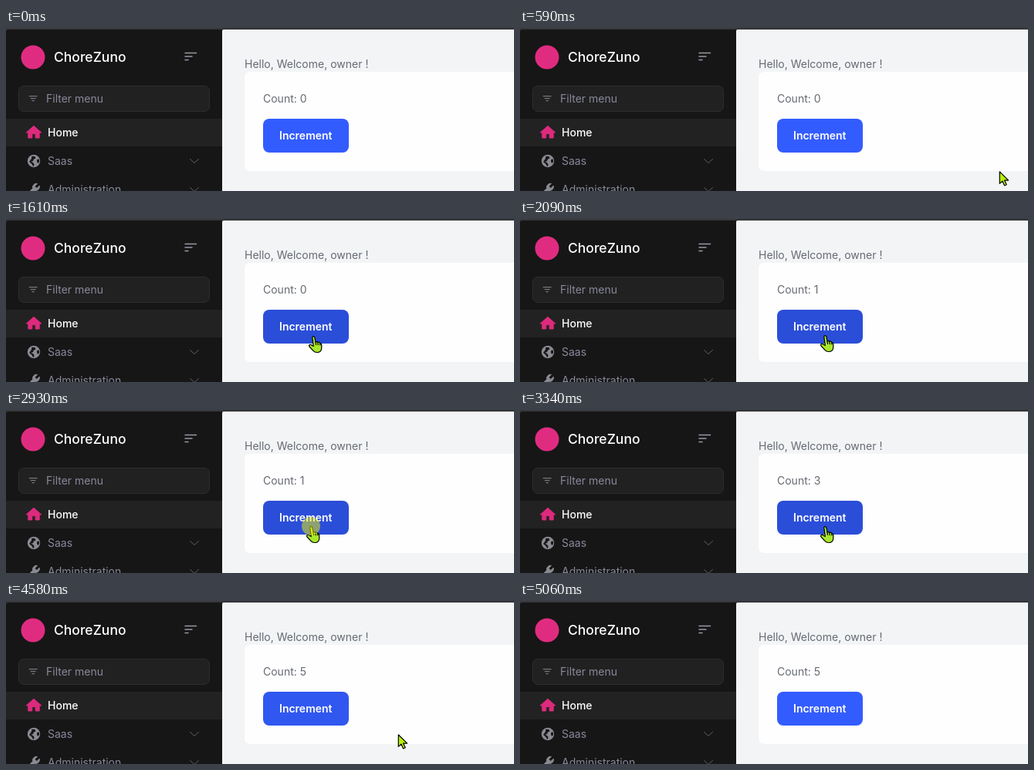
Write an HTML page that moves like this. It is 658 px wide and 212 px high and loops after 5.62 s.

```html
<!DOCTYPE html>
<html lang="en">
<head>
<meta charset="utf-8">
<title>Counter demo</title>
<style>
  html, body { margin: 0; width: 100%; height: 100%; overflow: hidden; background: #f3f4f6; }
  svg { display: block; width: 658px; height: 212px; font: 14px Inter, sans-serif; }
  .menu { fill: #88889c; }
  .line { fill: none; stroke-linecap: round; stroke-linejoin: round; }
  .body { fill: #656a73; }
</style>
</head>
<body>
<svg viewBox="0 0 658 212">
  <rect width="658" height="212" fill="#37373a"/>
  <path d="M0 212V5q0-3 3-3H280V212z" fill="#161616"/>
  <path d="M280 212V4q0-2 2-2H658V212z" fill="#f3f4f6"/>

  <!-- sidebar -->
  <circle cx="35" cy="38" r="15.5" fill="#e02c80"/>
  <text x="62" y="44" font-size="17.5" font-weight="500" fill="#fff">ChoreZuno</text>
  <path class="line" d="M232 32.6h14.5M232 37h9M232 41.4h4" stroke="#9898a6" stroke-width="1.5"/>
  <rect x="16.5" y="75.5" width="247" height="33" rx="6.5" fill="#212121" stroke="#2d2d2d"/>
  <path class="line" d="M30.2 88.7h10M32.2 91.7h6M34 94.7h2.4" stroke="#8b8b96"/>
  <text class="menu" x="52" y="97">Filter menu</text>

  <rect y="118" width="280" height="36" fill="#222"/>
  <path d="M36 127.3 45.8 136h-2.6v7h-5v-5.4h-4.4V143h-5v-7h-2.6z" fill="#dd2a7d" stroke="#dd2a7d" stroke-linejoin="round"/>
  <text x="54" y="141" font-weight="500" fill="#fff">Home</text>

  <circle cx="36" cy="173" r="8.2" fill="#8b8b94"/>
  <path d="M33.5 166.8l4 .2 1 2.6-2.6 1.2-1 2.4-2.6.4 2.8 1.6 1.6 2-1.2 3.2-2.2-3.6-3.2-2.8 2.8-4zM40.2 171l2.6-.6.4 3.4-1.6 2.2-1.6-2z" fill="#161616"/>
  <text class="menu" x="54" y="178">Saas</text>

  <path d="M40.5 202.4l-3 3 .5 2.3 2.3.5 3-3a5 5 0 0 1-6.4 6l-5 5-2.4-2.4 5.2-5.2a5 5 0 0 1 5.8-6.2z" fill="#8b8b94" stroke="#8b8b94" stroke-linejoin="round"/>
  <text class="menu" x="54" y="215">Administration</text>
  <path class="line" d="M238.5 170.5l5.5 5 5.5-5M238.5 207.5l5.5 5 5.5-5" stroke="#606066"/>

  <!-- page -->
  <text class="body" x="309" y="52">Hello, Welcome, owner !</text>
  <path d="M658 57H317q-8 0-8 8v113q0 8 8 8H658z" fill="#fefefe"/>
  <text class="body" id="count" x="333" y="97">Count: 0</text>
  <rect id="button" x="333" y="118" width="111" height="44" rx="8"/>
  <text x="354" y="145" font-weight="600" fill="#fff">Increment</text>

  <g id="cursor" stroke="#000" stroke-width="1.2" stroke-linejoin="round">
    <path id="arrow" d="M.3.9V16.4l3.6-3.3 2.7 5.9 2.6-1.2-2.6-5.7h5z" fill="#b8ee06"/>
    <g id="hand">
      <path d="M.2 12.5L-1.2 2.4Q-1.4.8 0 .6T1.8 2L3 8Q5 6.9 5.8 8.4 8 7.6 8.7 9.6 10.6 9.6 10.8 12V15.5Q10.6 20.6 6.5 21.4 2 22 0 19.4L-5 14Q-6 12-4.6 11.5-3 11 .2 13.5z" fill="#a8e82a"/>
      <path class="line" d="M3 8l.5 3.4M5.8 8.4l.4 3.2M8.7 9.6l.2 2.4"/>
    </g>
  </g>
  <circle id="press" cx="395" cy="151" r="12" fill="#ff0" fill-opacity=".47"/>
</svg>
<script>
const LOOP = 5620, CAPTURE = 67, FADE = 150;
const $ = id => document.getElementById(id);

const clamp = v => Math.min(1, Math.max(0, v));
const lerp = (a, b, p) => a + (b - a) * p;
const linear = p => p;
const easeIn = p => p * p;
const easeOut = p => 1 - (1 - p) ** 2;
const smooth = p => p * p * (3 - 2 * p);

// Pointer moves, each continuing from where the last one ended.
const origin = { x: 622, y: 213 };
const moves = [
  { from: 390, to: 520, x: 621, y: 184, ease: easeOut },
  { from: 520, to: 590, x: 620, y: 191, ease: linear },
  { from: 1030, to: 1050, x: 606, y: 189, ease: linear },
  { from: 1135, to: 1675, x: 395, y: 151, ease: easeOut },
  { from: 4290, to: 4555, x: 507, y: 173, ease: easeIn },
  { from: 4555, to: 4820, x: 618, y: 200, ease: easeOut },
  { from: 4900, to: 5020, x: 618, y: 213, ease: linear }
];

// One single click, then two double clicks.
const presses = [1830, ...[2790, 3690].flatMap(t => [t, t + 350])];
const HELD = 150, UPDATE = 200;

const hover = { on: 1410, off: 4470 };
const idleColor = [51, 92, 255], hoverColor = [43, 78, 216];

function pointerAt(t) {
  return moves.reduce((pos, m) => {
    const p = m.ease(clamp((t - m.from) / (m.to - m.from)));
    return { x: lerp(pos.x, m.x, p), y: lerp(pos.y, m.y, p) };
  }, origin);
}

const fade = (t, start) => smooth(clamp((t - start) / FADE));
const show = (id, on) => $(id).setAttribute("visibility", on ? "visible" : "hidden");

function draw(t) {
  const sampled = Math.floor(t / CAPTURE) * CAPTURE;
  const { x, y } = pointerAt(sampled);
  const overButton = x < 444;
  $("cursor").setAttribute("transform", `translate(${Math.round(x)} ${Math.round(y)})`);
  show("hand", overButton);
  show("arrow", !overButton);

  const mix = fade(sampled, hover.on) - fade(sampled, hover.off);
  const rgb = idleColor.map((c, i) => Math.round(lerp(c, hoverColor[i], mix)));
  $("button").setAttribute("fill", `rgb(${rgb})`);

  show("press", presses.some(p => t >= p && t < p + HELD));
  $("count").textContent = "Count: " + presses.filter(p => t >= p + UPDATE).length;
}

const start = performance.now();
function tick() {
  draw((performance.now() - start) % LOOP);
  requestAnimationFrame(tick);
}
tick();
</script>
</body>
</html>
```
